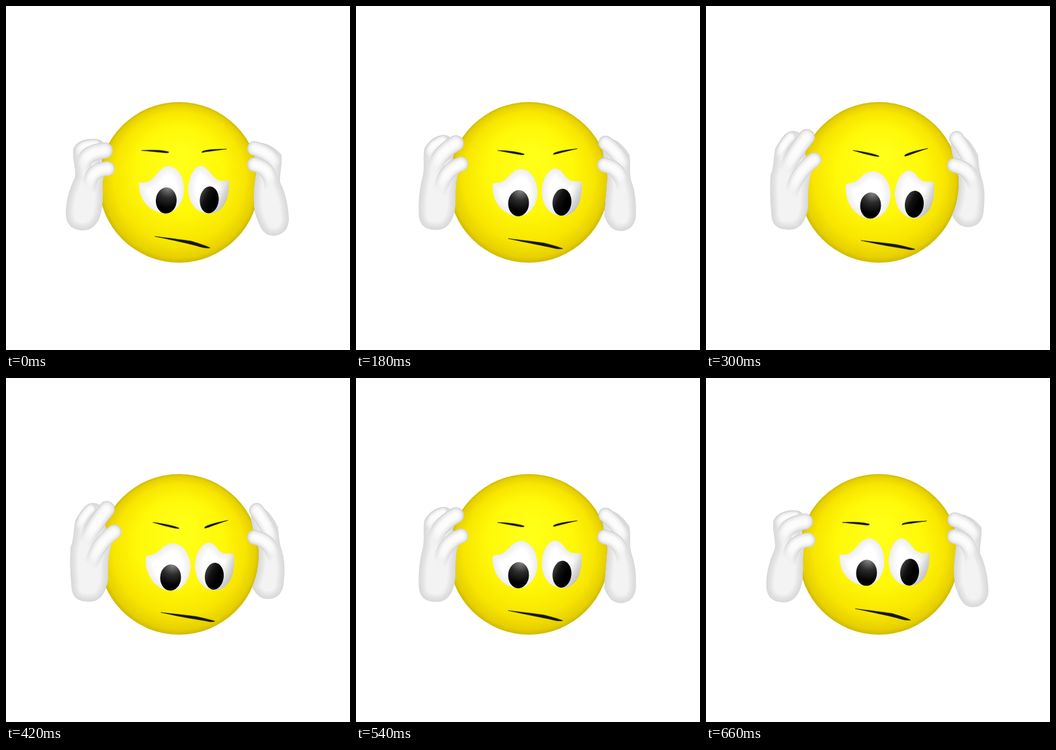
Write an HTML page with a canvas that moves like this. It is 512 px wide and 512 px high and loops after 720 ms.

```html
<!DOCTYPE html>
<html lang="en">
<head>
<meta charset="utf-8">
<title>Headache smiley</title>
<style>
html, body { margin: 0; width: 100%; height: 100%; overflow: hidden; background: #fff; }
canvas { display: block; }
</style>
</head>
<body>
<canvas id="stage" width="512" height="512"></canvas>
<script>
const ctx = document.getElementById('stage').getContext('2d');
const STEP = 60, STEPS = 12;

// Each shape is a pair of paths: relaxed and squeezed.
const SHAPES = {
  leftArm: [
    'M89 305 C90 285 96 268 103 254 C104 240 98 228 100 212 C106 199 125 195 140 199 C152 205 150 225 140 232 L146 252 C142 265 146 285 143 300 C141 318 132 334 115 334 C98 334 88 325 89 305Z',
    'M97 305 C95 285 95 268 96 252 C101 240 100 228 103 212 C110 200 118 186 128 186 C140 185 152 195 148 220 L158 246 C152 260 152 285 152 300 C149 320 140 333 125 333 C104 333 97 325 97 305Z'],
  rightArm: [
    'M372 205 C385 200 401 211 410 221 C412 235 407 250 408 262 C415 275 420 295 421 315 C422 333 410 342 398 342 C384 342 378 330 373 315 C368 305 367 280 371 255 C375 240 366 225 372 205Z',
    'M370 192 C385 188 397 205 405 222 C406 235 407 245 411 258 C416 275 415 290 413 308 C411 322 402 329 390 329 C378 329 372 322 366 311 C371 300 376 285 376 258 C375 240 355 205 370 192Z'],
  leftEye: [
    'M198 262 C203 263 211 264 219 256 C227 247 233 238 242 238 C257 239 265 256 265 272 C265 292 253 309 236 309 C215 307 196 290 198 262Z',
    'M208 266 C214 262 220 265 229 256 C237 248 243 246 250 246 C265 247 275 265 275 281 C274 302 262 317 245 317 C225 316 205 295 208 266Z'],
  rightEye: [
    'M271 274 C271 255 280 238 290 238 C303 239 306 256 317 259 C323 262 328 259 332 259 C334 285 324 309 303 309 C284 309 272 295 271 274Z',
    'M281 281 C281 262 291 245 302 245 C314 246 315 260 326 261 C332 262 336 260 339 263 C343 290 332 316 311 316 C293 316 282 300 281 281Z'],
  leftBrow: [
    'M202 215 C215 214 232 214 242 217 C243 219 238 219 232 218 C222 217 212 216 202 215Z',
    'M219 215 C230 216 247 219 257 223 C259 225 254 224 249 223 C239 221 229 218 219 215Z'],
  rightBrow: [
    'M328 213 C316 213 302 213 293 216 C289 219 293 218 297 217 C308 216 318 214 328 213Z',
    'M330 212 C318 214 305 217 297 221 C293 225 298 223 302 222 C312 218 321 215 330 212Z'],
  mouth: [
    'M222 343 C240 345 262 348 276 350 C289 354 298 357 304 360 C298 361 290 359 284 357 C266 352 245 348 222 343Z',
    'M231 349 C249 351 269 353 283 355 C297 358 305 360 311 362 C306 364 300 362 294 361 C275 358 252 354 231 349Z']
};

// Fingers: base, control point and tip in both poses, then thickness.
const LEFT_FINGERS = [
  [[106, 222, 108, 206, 133, 206], [108, 225, 113, 207, 126, 195], 16],
  [[113, 244, 114, 217, 147, 215], [117, 248, 128, 222, 150, 195], 24],
  [[123, 272, 124, 243, 151, 242], [126, 280, 136, 246, 161, 229], 22]
];
const RIGHT_FINGERS = [
  [[404, 240, 396, 219, 370, 212], [398, 244, 390, 220, 373, 197], 22],
  [[395, 268, 394, 241, 370, 236], [400, 267, 394, 242, 370, 237], 22]
];

const lerp = (a, b, q) => a + (b - a) * q;

function shape(name, q) {
  const [from, to] = SHAPES[name];
  const ends = to.match(/\d+/g);
  let i = 0;
  return new Path2D(from.replace(/\d+/g, n => lerp(+n, +ends[i++], q)));
}

function addStops(gradient, stops) {
  stops.forEach((c, i) => gradient.addColorStop(i / (stops.length - 1), c));
  return gradient;
}
const linear = (x0, y0, x1, y1, ...stops) =>
  addStops(ctx.createLinearGradient(x0, y0, x1, y1), stops);
const radial = (x, y, r, ...stops) =>
  addStops(ctx.createRadialGradient(x, y, 0, x, y, r), stops);

// Fills a path and darkens it softly towards its edge.
function soft(path, fill, shade) {
  ctx.save();
  ctx.clip(path);
  ctx.fillStyle = fill;
  ctx.fill(path);
  ctx.strokeStyle = `rgba(0,0,0,${shade})`;
  for (let w = 3; w < 24; w += 4) {
    ctx.lineWidth = w;
    ctx.stroke(path);
  }
  ctx.restore();
}

const arm = (name, q) => soft(shape(name, q), '#f3f3f3', 0.02);

// A rounded limb that blends into the palm at its base.
function finger([from, to, width], q) {
  const [x0, y0, cx, cy, x1, y1] = from.map((v, i) => lerp(v, to[i], q));
  const path = new Path2D(`M${x0} ${y0} Q${cx} ${cy} ${x1} ${y1}`);
  ctx.lineCap = 'round';
  for (let i = 0; i < 6; i++) {
    const v = 212 + 40 * Math.sqrt(i / 5);
    ctx.strokeStyle = linear(x0, y0, x1, y1,
      `rgba(${v},${v},${v},0)`, `rgb(${v},${v},${v})`, `rgb(${v},${v},${v})`);
    ctx.lineWidth = width * (1 - i * 0.13);
    ctx.stroke(path);
  }
}

function head() {
  const g = ctx.createRadialGradient(259, 225, 10, 257.5, 262.5, 119.5);
  g.addColorStop(0, '#ffff18');
  g.addColorStop(0.5, '#fff808');
  g.addColorStop(0.8, '#f8e600');
  g.addColorStop(0.95, '#e6d000');
  g.addColorStop(1, '#cfba00');
  ctx.fillStyle = g;
  ctx.beginPath();
  ctx.arc(257.5, 262.5, 119.5, 0, 7);
  ctx.fill();
}

function eye(name, q, white, x, y, rx, ry, tilt, iris) {
  const path = shape(name, q);
  soft(path, white, 0.012);
  ctx.save();
  ctx.clip(path);
  ctx.fillStyle = iris;
  ctx.beginPath();
  ctx.ellipse(x, y, rx, ry, tilt, 0, 7);
  ctx.fill();
  ctx.restore();
}

function draw(q) {
  ctx.fillStyle = '#fff';
  ctx.fillRect(0, 0, 512, 512);
  head();

  const lx = lerp(238.5, 245, q), ly = lerp(289.5, 297, q);
  const rx = lerp(302.5, 310, q), ry = lerp(288.5, 295, q);
  eye('leftEye', q, '#fff', lx, ly, 15.5, 19.5, 0.05,
    radial(lx + 3, ly - 20, 32, '#8c8c8c', '#2c2c2c', '#000'));
  eye('rightEye', q, linear(rx - 12, ry - 25, rx + 28, ry, '#fff', '#fff', '#ccc'),
    rx, ry, 14, 20, 0.1,
    linear(rx - 13, ry - 10, rx + 6, ry, '#444', '#111', '#000'));

  ctx.fillStyle = ctx.strokeStyle = '#15150a';
  ctx.lineWidth = 0.5;
  for (const name of ['leftBrow', 'rightBrow', 'mouth']) {
    const path = shape(name, q);
    ctx.fill(path);
    ctx.stroke(path);
  }

  arm('rightArm', q);
  RIGHT_FINGERS.forEach(f => finger(f, q));
  arm('leftArm', q);
  LEFT_FINGERS.forEach(f => finger(f, q));
}

function tick() {
  const step = Math.floor(performance.now() / STEP) % STEPS;
  draw((1 - Math.cos(step / STEPS * 2 * Math.PI)) / 1.866);
  requestAnimationFrame(tick);
}
tick();
</script>
</body>
</html>
```
